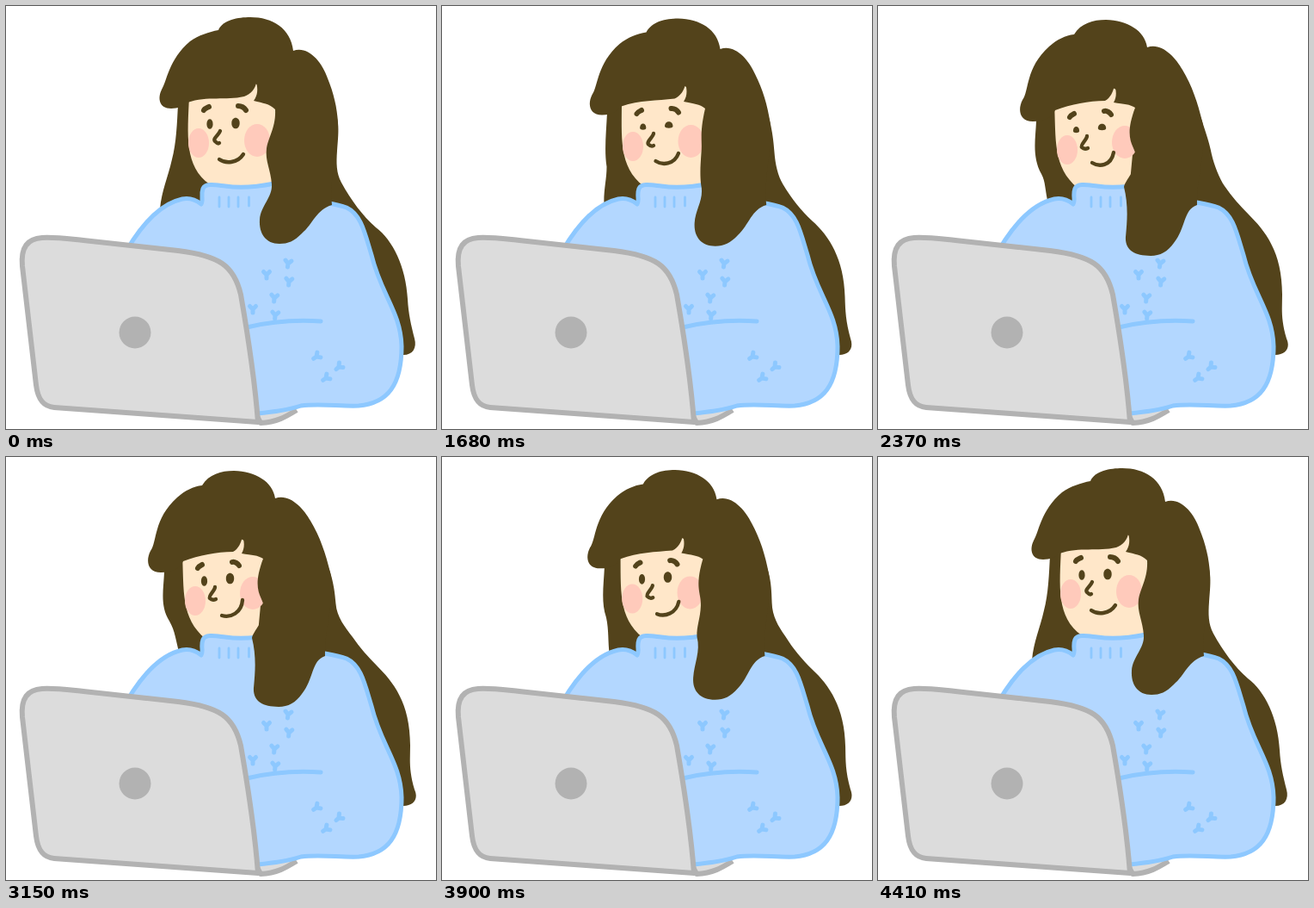
Write an HTML page that moves like this. It is 500 by 491 pixels and loops after 4740 ms.

```html
<!DOCTYPE html>
<html lang="en">
<head>
<meta charset="utf-8">
<title>Girl at a laptop</title>
<style>
  html, body { margin: 0; width: 100%; height: 100%; overflow: hidden; background: #fff; }
  svg { display: block; width: 100%; height: 100%; }
  .hair, .eye { fill: #53431b; }
  .skin { fill: #ffe7c9; }
  .cheek { fill: #ffcabb; }
  .ink { fill: none; stroke: #53431b; stroke-width: 4.3; stroke-linecap: round; stroke-linejoin: round; }
  .brow { stroke-width: 6; }
  .wool { fill: #b3d7ff; stroke: #8dc8ff; stroke-width: 5; stroke-linejoin: round; }
  .knit { fill: none; stroke: #8dc8ff; stroke-linecap: round; stroke-linejoin: round; }
  .metal { fill: #dcdcdc; stroke: #b2b2b2; stroke-width: 6; stroke-linejoin: round; }
</style>
</head>
<body>
<svg viewBox="0 0 500 491">
  <path id="rear" class="hair"/>
  <path id="face" class="skin"/>
  <ellipse id="cheekL" class="cheek" rx="12" ry="17"/>
  <ellipse id="cheekR" class="cheek" rx="15" ry="19"/>
  <path id="browL" class="ink brow"/>
  <path id="browR" class="ink brow"/>
  <path id="eyeL" class="eye"/>
  <path id="eyeR" class="eye"/>
  <path id="nose" class="ink"/>
  <path id="mouth" class="ink"/>

  <path class="metal" d="M285 462L296 484C315 483 325 477 338 469"/>
  <path class="wool" d="M140 284C160 250 182 229 205 224C215 222 222 226 227 230C230 225 226 220 229 212C232 205 245 208 255 209C275 212 292 210 312 206L340 220C360 228 380 228 396 234C413 242 417 263 425 289C436 335 459 355 460 395C460 440 444 461 410 464C390 465 365 461 343 464C325 470 305 472 280 474Z"/>
  <path class="knit" stroke-width="2.8" d="M248 222V233M259 222V233M270 222V233M282.5 222V232"/>
  <path class="knit" stroke-width="5" d="M280 373C305 367 335 364 366 366"/>
  <g id="marks" class="knit" stroke-width="5"></g>

  <path id="front" class="hair"/>

  <path class="metal" d="M19 302C17 280 25 270 42 269C55 268 70 270 90 272L200 284C248 290 265 301 273 335C280 375 289 430 293 483L56 466C43 465 37 456 35 440Z"/>
  <circle cx="150" cy="379" r="18.5" fill="#b2b2b2"/>
</svg>
<script>
const LOOP = 4740, STEP = 30;
const $ = id => document.getElementById(id);
const lerp = (a, b, w) => a + (b - a) * w;
const clamp = x => Math.min(1, Math.max(0, x));
const ramp = (t, from, to) => clamp((t - from) / (to - from));
const ease = x => x < .5 ? 2 * x * x : 1 - 2 * (1 - x) ** 2;
const numbers = d => d.match(/-?[\d.]+/g).map(Number);

// Blends two paths of equal structure; weight may depend on the point's height.
function blend(a, b, weight) {
  const na = numbers(a), nb = numbers(b);
  let i = 0;
  return a.replace(/-?[\d.]+/g, () => {
    const w = typeof weight === "function" ? weight(na[i | 1]) : weight;
    return lerp(na[i], nb[i++], w).toFixed(2);
  });
}

const frontUp = "M192 119C178 119 176 107 181 97C187 88 189 62 214 41C224 34 236 30 247 28C252 16 270 13 284 13C310 13 331 26 334 52C351 46 367 64 374 84C381 101 385 118 386 136C386 160 376 200 379 231C361 236 357 253 344 264C335 273 328 276 318 276C302 276 294 264 295 248C296 232 310 222 309 207C308 190 301 180 303 165C306 150 314 140 313 120C306 113 299 113 288 110C293 103 293 96 291 89C290 96 285 102 277 105C255 110 235 104 211 112C207 116 200 119 192 119Z";
const frontDown = "M180 134C165 134 162 121 168 109C176 99 171 72 199 47C208 39 218 34 228 33C236 20 250 16 265 16C290 17 310 28 313 48C330 42 346 60 354 74C365 92 372 113 377 134C384 160 370 200 371 231C355 236 358 258 344 275C337 285 328 290 317 290C298 290 287 283 288 268C290 248 291 230 286 210C288 201 300 192 300 176C300 162 284 158 299 118C293 114 286 114 274 112C278 105 277 98 275 91C274 99 270 107 264 110C245 110 225 114 206 121C203 128 195 134 180 134Z";
const rearUp = "M230 90C212 95 201 103 200 114C199 135 198 160 193 178C188 200 181 214 179 236C240 300 380 380 462 405C473 405 478 397 475 386C471 370 468 358 467 340C465 303 450 272 430 257C415 244 401 225 390 205C384 194 384 182 385 168C386 155 387 145 386 136C384 115 370 90 350 80Z";
const rearDown = "M222 100C205 105 187 118 184 134C183 155 179 175 190 195C195 204 194 214 198 230C250 300 380 380 462 405C474 405 480 397 475 386C468 362 470 350 470 335C470 285 450 261 431 242C421 232 411 221 403 209C397 200 391 185 388 172C385 157 381 147 377 134C370 110 352 90 335 80Z";
const rearRest = "M222 100C205 105 187 118 184 134C183 155 179 173 190 190C197 202 198 214 202 228C250 300 380 380 462 405C474 405 480 397 475 386C468 362 470 350 470 335C470 285 450 261 431 242C421 232 411 221 403 209C394 197 384 186 383 170C382 157 381 147 377 134C370 110 352 90 335 80Z";
const mouthUp = "M248 178C255 183 269 183 276 172";
const mouthDown = "M249 182C257 187 271 186 274 170";
const mouthSmile = "M251 184C261 187 274 181 275 166";

// Parts that simply follow the head: raised pose, lowered pose.
const followers = {
  face: ["M213 105C211 150 207 186 237 207L318 215L318 100L260 80Z", "M205 112C207 155 203 187 232 211L292 215L302 108L250 85Z"],
  browL: ["M230 121C231 119 234 118 236 117", "M223 129C224 127 226 126 228 125"],
  browR: ["M270 116C274 116 277 118 279 121", "M263 122C266 121 270 124 271 126"],
  nose: ["M249 145C248 149 240 154 243 157C245 159 247 160 248 159", "M243 151C243 155 235 161 237 164C239 166 242 166 244 165"]
};
const cheeks = { cheekL: [224, 159, 220, 167], cheekR: [292, 156, 287, 158] };
const eyes = { eyeL: [237, 137, 230.5, 144, 3.6, 5.8], eyeR: [267, 136, 260.5, 141, 4.7, 6.3] };

function eyePath([xa, ya, xb, yb, rx, ry], head, squint) {
  const x = lerp(xa, xb, head), y = lerp(ya, yb, head) + squint;
  const up = 4 / 3 * lerp(ry, ry * .85, squint), low = 4 / 3 * lerp(ry, 2.2, squint);
  return `M${x - rx} ${y}C${x - rx} ${y - up} ${x + rx} ${y - up} ${x + rx} ${y}` +
    `C${x + rx} ${y + low} ${x - rx} ${y + low} ${x - rx} ${y}Z`;
}

const marks = [[303, 312, 0], [328, 299, 8], [329, 320, 5], [312, 339, 5], [287, 352, 0], [313, 359, 5],
  [361, 407, 55], [387, 419, 50], [372, 432, 55]];
$("marks").innerHTML = marks.map(([x, y, r]) =>
  `<path transform="translate(${x} ${y}) rotate(${r})" d="M-3.5 -3.5L0 0L3.5 -3.5M0 0V4"/>`).join("");

function draw(t) {
  const head = ease(ramp(t, 1230, 2130)) - ease(ramp(t, 3570, 4410));
  const dip = head ** 2.4;
  const settle = ease(ramp(t, 2280, 3390));
  const smile = ease(ramp(t, 2370, 3150));
  const squint = ease(ramp(t, 1260, 1590)) - ease(ramp(t, 2370, 2670));

  for (const id in followers) $(id).setAttribute("d", blend(...followers[id], head));
  for (const id in cheeks) {
    const [xa, ya, xb, yb] = cheeks[id];
    $(id).setAttribute("cx", lerp(xa, xb, head));
    $(id).setAttribute("cy", lerp(ya, yb, head));
  }
  for (const id in eyes) $(id).setAttribute("d", eyePath(eyes[id], head, squint));
  $("mouth").setAttribute("d", blend(mouthUp, blend(mouthDown, mouthSmile, smile), head));
  $("rear").setAttribute("d", blend(rearUp, blend(rearDown, rearRest, settle), head));
  // The long lock trails behind the head.
  $("front").setAttribute("d", blend(frontUp, frontDown, y => lerp(head, dip, ramp(y, 170, 240))));
}

const start = performance.now();
function tick() {
  const t = (performance.now() - start) % LOOP;
  draw(Math.floor(t / STEP) * STEP);
  requestAnimationFrame(tick);
}
draw(0);
requestAnimationFrame(tick);
</script>
</body>
</html>
```
